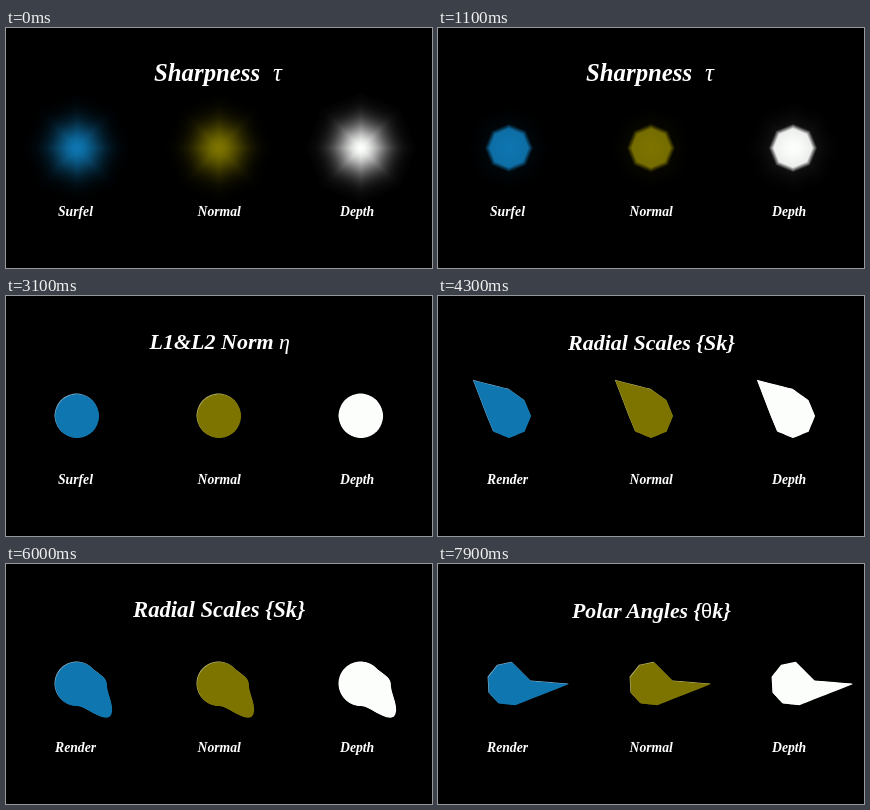
These frames come from a looping animation (426x240 px, 8 s). An HTML page with a canvas:

```html
<!DOCTYPE html>
<html lang="en">
<head>
<meta charset="utf-8">
<title>Radial kernel parameters</title>
<style>
html, body { margin: 0; width: 100%; height: 100%; overflow: hidden; background: #000; }
canvas, svg { position: absolute; left: 0; top: 0; width: 426px; height: 240px; display: block; }
text { font: italic 700 13.7px "Liberation Serif", "Times New Roman", serif; fill: #fff; white-space: pre; }
.greek { font-weight: 400; }
.sans { font: 400 20px "Liberation Sans", Arial, sans-serif; }
</style>
</head>
<body>
<canvas id="stage" width="426" height="240"></canvas>
<svg viewBox="0 0 426 240">
  <g id="titles">
    <text x="148" y="52.500" style="font-size:24.800px">Sharpness<tspan class="greek" x="267">τ</tspan></text>
    <text x="143.500" y="53" style="font-size:22px">L1&amp;L2 Norm<tspan class="greek" x="273">η</tspan></text>
    <text x="130" y="53.500" style="font-size:22px">Radial Scales {Sk}</text>
    <text x="127" y="52.500" style="font-size:22.700px">Radial Scales {Sk}</text>
    <text x="134" y="54" style="font-size:21.800px">Polar Angles {<tspan class="sans">θ</tspan>k}</text>
  </g>
  <text id="first" x="52" y="188">Surfel</text>
  <text x="191.500" y="188">Normal</text>
  <text x="334" y="188">Depth</text>
</svg>
<script>
const LOOP = 8000, STEP = 100;
const BASE = 22, PEAK = 60, CY = 120;
const STARTS = [0, 2000, 3800, 5000, 6200];
const SHAPES = [
  { x: 71, rgb: [16, 118, 176], rim: 'rgb(135,175,200)' },
  { x: 213, rgb: [125, 116, 0], rim: 'rgb(185,180,120)' },
  { x: 355, rgb: [252, 254, 252], rim: 'rgb(255,255,255)' }
];
// how far each corner has turned by the end, in degrees
const TURNS = [0, 37, 8, 14, 18, 21, 28, 29];

const ctx = document.getElementById('stage').getContext('2d');
const titles = [...document.getElementById('titles').children];
const first = document.getElementById('first');
const clamp = (v, lo = 0, hi = 1) => Math.min(hi, Math.max(lo, v));

// corner radii with a spike travelling around the ring
function spikeRadii(u) {
  return TURNS.map((_, k) => {
    const d = k ? Math.abs(u - k) : Math.min(Math.abs(u), Math.abs(u - 8));
    return BASE + (PEAK - BASE) * Math.pow(clamp(1 - d), 1.3);
  });
}

function kernel(t) {
  const pose = { radii: TURNS.map(() => BASE), turn: 0, round: 0 };
  if (t >= 6200) {
    pose.radii = spikeRadii(8);
    pose.turn = clamp((t - 6200) / 1700);
  } else if (t >= 5000) {
    pose.radii = spikeRadii(clamp((t - 5070) / 127.5, 0, 8));
    pose.round = t > 5050 ? 1 : 0;
  } else if (t >= 3800) {
    pose.radii = spikeRadii(Math.min(8, (t - 3943) / 127.5));
  } else if (t >= 2000) {
    pose.round = Math.sin(Math.PI * clamp((t - 2000) / 1700));
  }
  return pose;
}

// straight edges (L1) blended with elliptic arcs (L2)
function outline({ radii, turn, round }) {
  const angles = TURNS.map((d, k) => (d * turn - 45 * k) * Math.PI / 180);
  const points = [];
  for (let k = 0; k < 8; k++) {
    const a = angles[k];
    const end = k < 7 ? angles[k + 1] : -2 * Math.PI;
    const r1 = radii[k], r2 = radii[(k + 1) % 8];
    const gap = a - end;
    for (let i = 0; i < 12; i++) {
      const f = i / 12, phi = gap * f;
      const line = r1 * r2 * Math.sin(gap) / (r1 * Math.sin(phi) + r2 * Math.sin(gap - phi));
      const q = f * Math.PI / 2;
      const arc = 1 / Math.hypot(Math.cos(q) / r1, Math.sin(q) / r2);
      const r = line + (arc - line) * round;
      points.push([r * Math.cos(a - phi), r * Math.sin(a - phi)]);
    }
  }
  return points;
}

function fillShape(points, x, y, scale, color) {
  ctx.beginPath();
  for (const [px, py] of points) ctx.lineTo(x + px * scale, y + py * scale);
  ctx.closePath();
  ctx.fillStyle = color;
  ctx.fill();
}

// a Gaussian that is one half at the base radius, steepened there
function level(r, sharp) {
  const soft = 1 - sharp;
  const glow = Math.pow(0.5, (r / BASE) ** 2);
  const edge = clamp((glow - 0.5) / (soft + 0.01) + 0.5);
  return soft * glow + sharp * edge;
}

function drawSoft({ x, rgb }, points, sharp) {
  for (let r = 56; r > 0; r -= 0.5) {
    const v = level(r, sharp);
    fillShape(points, x, CY, r / BASE, `rgb(${rgb.map(c => Math.round(c * v))})`);
  }
}

function drawSharp({ x, rgb, rim }, points) {
  fillShape(points, x - 0.5, CY - 0.5, 1, rim);
  fillShape(points, x + 0.1, CY + 0.1, 1, `rgb(${rgb})`);
}

function render(t) {
  const part = STARTS.filter(s => t >= s).length - 1;
  titles.forEach((el, i) => el.setAttribute('visibility', i === part ? 'visible' : 'hidden'));
  first.textContent = part < 2 ? 'Surfel' : 'Render';
  first.setAttribute('x', part < 2 ? 52 : 49);

  ctx.fillStyle = '#000';
  ctx.fillRect(0, 0, 426, 240);
  const points = outline(kernel(t));
  const sharp = Math.sin(Math.PI / 2 * clamp(t / 1700));
  for (const shape of SHAPES) {
    if (sharp < 1) drawSoft(shape, points, sharp);
    else drawSharp(shape, points);
  }
}

const begin = performance.now();
let shown = -1;
function tick() {
  const elapsed = (performance.now() - begin) % LOOP;
  const t = Math.floor(elapsed / STEP) * STEP;
  if (t !== shown) render(shown = t);
  requestAnimationFrame(tick);
}
tick();
</script>
</body>
</html>
```
